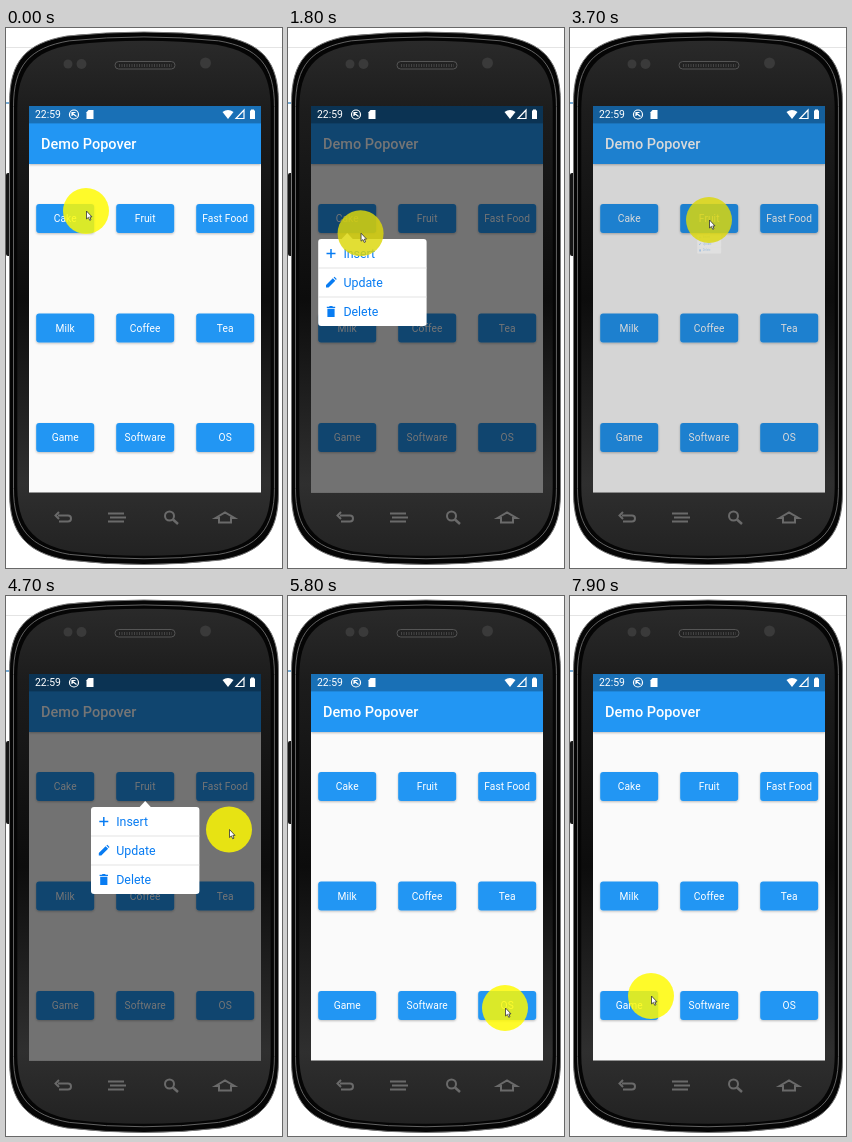
Recreate the animation shown at these times as an HTML page. Size 276x540 px, loop 8 s.

```html
<!DOCTYPE html>
<html lang="en">
<head>
<meta charset="utf-8">
<title>Demo Popover</title>
<style>
  html, body { margin: 0; width: 100%; height: 100%; overflow: hidden; background: #fff; }
  svg { display: block; width: 100vw; height: 100vh; }
  text { font-family: Roboto, sans-serif; fill: #fff; }
  .title { font-size: 14.5px; font-weight: 500; }
  .clock { font-size: 10.4px; }
  .button { font-size: 10.2px; text-anchor: middle; letter-spacing: .08px; }
  .item { font-size: 12.4px; fill: #087cf2; }
</style>
</head>
<body>
<svg viewBox="0 0 276 540">
  <defs>
    <linearGradient id="bezel" x2="0" y2="1">
      <stop offset="0" stop-color="#2a2a2a"/>
      <stop offset=".14" stop-color="#1c1c1c"/>
      <stop offset=".5" stop-color="#0c0c0c"/>
      <stop offset=".86" stop-color="#2f2f2f"/>
      <stop offset="1" stop-color="#222"/>
    </linearGradient>
    <filter id="shadow" x="-10%" y="-20%" width="120%" height="150%">
      <feDropShadow dx="0" dy="1" stdDeviation="1.2" flood-opacity=".25"/>
    </filter>
    <path id="shell" d="M3.5 75C3.5 33 20 15 61 8Q138 0 215 8C256 15 272.5 33 272.5 75V465C272.5 506 255 525 215 532Q138 541 61 532C21 525 3.5 506 3.5 465Z"/>
    <clipPath id="screen"><rect x="23" y="78" width="232" height="386.5"/></clipPath>
  </defs>

  <path d="M0 19.5H276" stroke="#e4e4e4"/>
  <path d="M0 75H4" stroke="#4a90c8" stroke-width="1.5"/>
  <rect y="145" width="6" height="83" rx="2" fill="#151515"/>

  <use href="#shell" fill="#050505" stroke="#777"/>
  <use href="#shell" fill="none" stroke="#666" transform="translate(4.1 5) scale(.97 .98)"/>
  <use href="#shell" fill="url(#bezel)" transform="translate(8 9) scale(.942 .967)"/>

  <g fill="#3a3a3a">
    <circle cx="62" cy="36" r="4.5"/>
    <circle cx="75.5" cy="36" r="5"/>
    <circle cx="199.5" cy="35" r="5.5"/>
  </g>
  <rect x="109" y="33.5" width="60" height="7.5" rx="3.7" fill="#222" stroke="#555"/>
  <path d="M113 37.5H166" stroke="#444" stroke-width="3" stroke-dasharray="1 1.5"/>

  <g fill="none" stroke="#6a6a6a" stroke-width="2">
    <path d="M52 487.5H62Q65 487.5 65 490.5T62 493.500H53M53 484L49.5 487.5L53 491"/>
    <path d="M102 485.5H118M104 489.5H120M102 493.5H118"/>
    <circle cx="163.5" cy="488" r="4.5"/>
    <path d="M167 491.5L172 496" stroke-width="2.5"/>
    <path d="M209.5 490L219 484.5L228.5 490H225V494.5H213V490Z"/>
  </g>

  <g clip-path="url(#screen)">
    <rect x="23" y="78" width="232" height="387" fill="#fafafa"/>
    <rect x="23" y="95" width="232" height="41" fill="#2196f3" filter="url(#shadow)"/>
    <rect x="23" y="78" width="232" height="17.4" fill="#1970b6"/>
    <text class="title" x="35" y="121">Demo Popover</text>
    <g id="buttons"></g>
    <rect id="barrier" x="23" y="78" width="232" height="387" opacity="0"/>
    <g id="popovers"></g>
    <g fill="#fff">
      <text class="clock" x="29" y="90.3">22:59</text>
      <g fill="none" stroke="#fff" stroke-width="1.2">
        <circle cx="68" cy="86.5" r="4.5"/>
        <path d="M66 85L70.5 88.5M66 88V84.5H69.5"/>
        <path d="M238 82V90.5H230Z"/>
      </g>
      <path d="M82.5 82H87.5V91H80.5V84.2Z"/>
      <path d="M216.5 84Q222 80 227.5 84L222 91Z"/>
      <path d="M244 82.5H245V81.5H248V82.5H249V91H244Z"/>
    </g>
  </g>

  <g id="cursor">
    <circle id="halo" r="23" fill-opacity=".83"/>
    <path d="M.5 0V8L2.4 6.4L3.7 9.3L5 8.7L3.8 5.9H6Z" fill="#fff" stroke="#333" stroke-width=".8"/>
  </g>
</svg>

<script>
const LOOP = 8000, STEP = 100;
const BUTTON = { width: 58, height: 29 };
const MENU = { width: 108.4, row: 29, arrow: 6, fade: 200 };
const $ = id => document.getElementById(id);
const clamp = v => Math.min(1, Math.max(0, v));

const labels = [["Cake", "Fruit", "Fast Food"], ["Milk", "Coffee", "Tea"], ["Game", "Software", "OS"]];
const center = (col, row) => [59.2 + 80 * col, 190.5 + 109.5 * row];

$("buttons").innerHTML = labels.flatMap((names, row) => names.map((name, col) => {
  const [x, y] = center(col, row);
  return `<rect x="${x - BUTTON.width / 2}" y="${y - BUTTON.height / 2}" width="${BUTTON.width}"
      height="${BUTTON.height}" rx="3" fill="#2196f3" filter="url(#shadow)"/>
    <text class="button" x="${x}" y="${y + 3.7}">${name}</text>`;
})).join("");

const items = [
  ["Insert", '<path d="M-4.5 0H4.5M0 -4.5V4.5" stroke="#087cf2" stroke-width="1.5"/>'],
  ["Update", '<path d="M-5 5V2.5L1.8 -4.3L4.3 -1.8L-2.5 5ZM2.6 -5L3.5 -5.7L5.7 -3.5L5 -2.6Z"/>'],
  ["Delete", '<path d="M-4.2 -4.8H-2L-1.2 -5.6H1.2L2 -4.8H4.2V-3.5H-4.2ZM-3.6 -2.8H3.6V5.5H-3.6Z"/>']
];

const popovers = [
  { col: 0, row: 0, open: 1200, close: 2600 },
  { col: 1, row: 0, open: 3700, close: 4900 },
  { col: 2, row: 2, open: 6400, close: 7600 }
];

// Menus align with the outer edge of their column and flip above the last row.
for (const p of popovers) {
  const up = p.row === 2, side = up ? -1 : 1;
  const height = items.length * MENU.row;
  const left = -BUTTON.width / 2 - p.col / 2 * (MENU.width - BUTTON.width);
  const top = up ? -MENU.arrow - height : MENU.arrow;
  const rows = items.map(([label, icon], i) => {
    const y = top + MENU.row * (i + .5);
    const line = i ? `<path d="M${left} ${y - MENU.row / 2}h${MENU.width}" stroke="#dcdcdc" stroke-width=".8"/>` : "";
    return `${line}<g fill="#087cf2" transform="translate(${left + 12.8} ${y})">${icon}</g>
      <text class="item" x="${left + 25.2}" y="${y + 4.4}">${label}</text>`;
  }).join("");
  p.home = center(p.col, p.row);
  p.tip = [p.home[0], p.home[1] + side * BUTTON.height / 2 - (up ? 5 : 0)];
  p.node = document.createElementNS("http://www.w3.org/2000/svg", "g");
  p.node.innerHTML = `<path d="M0 0L-6 ${side * 6.5}H6Z" fill="#fff"/>
    <rect x="${left}" y="${top}" width="${MENU.width}" height="${height}" rx="3" fill="#fff"/>${rows}`;
  $("popovers").append(p.node);
}

const start = [80, 183];
const moves = [
  { at: 0, time: 400, to: [65, 191] },
  { at: 1700, time: 600, to: [167, 245.5], bend: [0, 44] },
  { at: 2600, time: 400, to: [139, 192] },
  { at: 4300, time: 400, to: [223, 233.5] },
  { at: 5000, time: 800, to: [217, 412], bend: [16, 0] },
  { at: 7000, time: 300, to: [187, 240] },
  { at: 7500, time: 400, to: [81, 400] }
];

function cursorAt(time) {
  let pos = start;
  for (const { at, time: span, to, bend = [0, 0] } of moves) {
    const t = clamp((time - at) / span), k = t * t * (3 - 2 * t);
    pos = pos.map((v, i) => v + (to[i] - v) * k + bend[i] * Math.sin(Math.PI * k));
  }
  return pos;
}

const scaleAt = ({ open, close }, time) => time < open ? 0
  : clamp(time < close ? .22 + (time - open) / MENU.fade : .655 - (time - close) / MENU.fade);
const fade = s => clamp(s + 1.5 * s * s * (1 - s));

function draw() {
  const time = Math.floor(performance.now() % LOOP / STEP) * STEP;
  const [x, y] = cursorAt(time);
  let dim = 0, pressed = false;
  for (const p of popovers) {
    const s = scaleAt(p, time), alpha = fade(s);
    p.node.setAttribute("transform", `translate(${p.tip}) scale(${s})`);
    p.node.setAttribute("opacity", alpha);
    p.node.setAttribute("visibility", s ? "visible" : "hidden");
    dim = Math.max(dim, alpha);
    pressed ||= s > 0 && Math.hypot(x - p.home[0], y - p.home[1]) < 20;
  }
  $("barrier").setAttribute("opacity", dim * .54);
  $("halo").setAttribute("fill", pressed ? "#dcd80c" : "#fffa00");
  $("cursor").setAttribute("transform", `translate(${x} ${y})`);
  requestAnimationFrame(draw);
}
draw();
</script>
</body>
</html>
```
